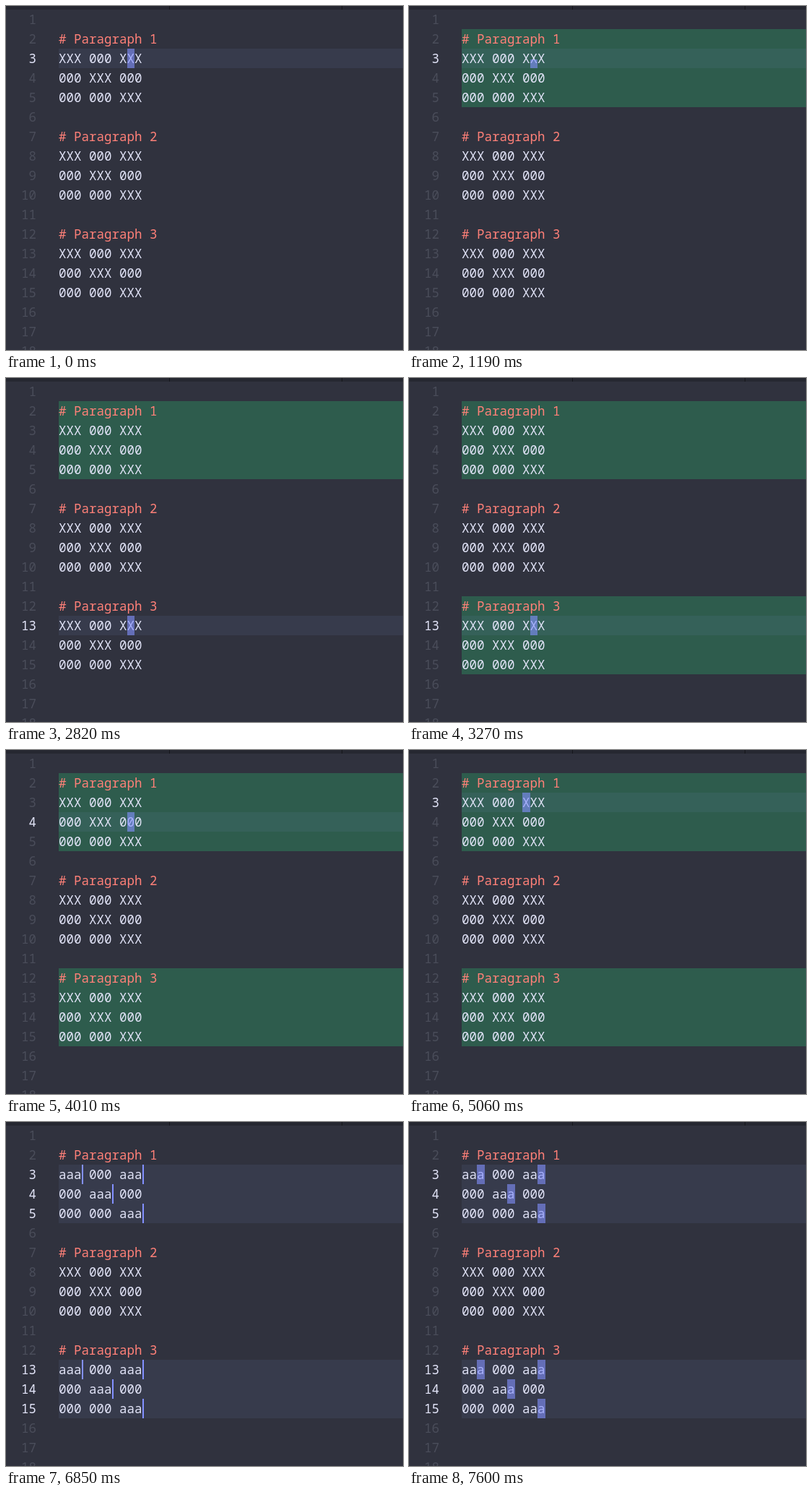
Animation of 550x476 px, one loop 8000 ms. Source, as an HTML page:

```html
<!DOCTYPE html>
<html lang="en">
<head>
<meta charset="utf-8">
<title>Multi-cursor editing</title>
<style>
  html, body { margin: 0; width: 100%; height: 100%; overflow: hidden; background: #30323e; }
  #stage {
    position: relative; width: 550px; height: 476px; overflow: hidden; background: #30323e;
    font: 500 17.5px/27px "Noto Sans Mono", "DejaVu Sans Mono", monospace;
    color: #e2e4f8; white-space: pre;
  }
  #stage div { position: absolute; }
  #tabs { left: 0; top: 0; width: 550px; height: 5px; background: #262831; }
  #tabs div { top: 0; width: 1px; height: 5px; background: #15161b; }
  #view { inset: 0; }
  .line { left: 73px; }
  .head { color: #ff8078; }
  .num { left: 0; width: 42px; text-align: right; color: #4a4d5a; font-weight: 400; }
  .num.on { color: #e2e4f8; }
  .row { background: rgba(120, 135, 190, .1); }
  .green { background: #2e5c4d; }
  .sel { background: #494c5a; }
  .cursor { background: #8390ff; opacity: .6; }
  .cursor.bar { opacity: 1; }
  #popup {
    left: 126px; top: 411px; width: 391px; height: 90px;
    background: #282a34; display: none;
  }
  #popup div { left: 0; top: 4px; width: 100%; height: 32px; line-height: 32px; background: #3a3e50; text-indent: 31px; }
</style>
</head>
<body>
<div id="stage">
  <div id="view"></div>
  <div id="tabs"><div style="left:226px"></div><div style="left:465px"></div></div>
  <div id="popup"><div>Paragraph</div></div>
</div>
<script>
const LOOP = 8000, LEFT = 73, CHAR = 10.5, ROW = 27;
const view = document.getElementById('view');
const popup = document.getElementById('popup');

const top_ = line => 5 + (line - 1) * ROW;
const colX = col => LEFT + col * CHAR;

// Each cue changes part of the state from its time on.
const cues = [
  [0, { at: [3, 9], shape: 'block', green: [], word: 'XXX', multi: false, sel: false, popup: false }],
  [450, { shape: 'none' }],
  [740, { shape: 'half' }],
  [1190, { green: [2] }],
  [1340, { shape: 'block' }],
  [1940, { at: [4, 9] }],
  [2090, { at: [5, 9] }],
  [2240, { at: [7, 9] }],
  [2380, { at: [8, 9] }],
  [2520, { at: [10, 9] }],
  [2820, { at: [13, 9] }],
  [3270, { green: [2, 12] }],
  [3560, { at: [12, 9] }],
  [3860, { at: [8, 9] }],
  [4010, { at: [4, 9] }],
  [4460, { at: [4, 8] }],
  [4760, { at: [4, 4] }],
  [4910, { at: [4, 0] }],
  [5060, { at: [3, 8] }],
  [5510, { green: [], multi: true, sel: true }],
  [6260, { sel: false, word: '', shape: 'bar' }],
  [6550, { word: 'a' }],
  [6700, { word: 'aa' }],
  [6850, { word: 'aaa' }],
  [7000, { popup: true }],
  [7300, { shape: 'none' }],
  [7600, { shape: 'block', popup: false }]
];

const box = (cls, x, y, w, h) =>
  `<div class="${cls}" style="left:${x}px;top:${y}px;width:${w}px;height:${h}px"></div>`;
const text = (cls, line, s) => `<div class="${cls}" style="top:${top_(line)}px">${s}</div>`;

function cursorBox([line, col], shape) {
  const x = colX(col), y = top_(line);
  if (shape === 'block') return box('cursor', x, y, CHAR, ROW);
  if (shape === 'half') return box('cursor', x, y + 15, CHAR, 12);
  if (shape === 'bar') return box('cursor bar', x, y, 2, ROW);
  return '';
}

// Word ends in the first and third paragraph.
function wordEnds(n) {
  return [3, 13].flatMap(l => [[l, n], [l, 2 * n + 5], [l + 1, n + 4], [l + 2, n + 8]]);
}

function render(s) {
  const ends = wordEnds(s.word.length);
  const back = s.shape === 'block' ? 1 : 0;
  const cursors = s.multi ? ends.map(([l, c]) => [l, c - back]) : [s.at];
  const active = [...new Set(cursors.map(c => c[0]))];

  let html = s.green.map(l => box('green', LEFT, top_(l), 550 - LEFT, 4 * ROW)).join('');
  for (const l of active) {
    html += s.sel ? box('row', 0, top_(l), LEFT, ROW) : box('row', LEFT, top_(l), 550 - LEFT, ROW);
  }
  if (s.sel) html += ends.map(([l, c]) => box('sel', colX(c - 3), top_(l), 3 * CHAR, ROW)).join('');

  for (let l = 1; l <= 18; l++) html += text(active.includes(l) ? 'num on' : 'num', l, l);
  for (let p = 0; p < 3; p++) {
    const l = 2 + 5 * p, w = p === 1 ? 'XXX' : s.word;
    html += text('line head', l, `# Paragraph ${p + 1}`)
      + text('line', l + 1, `${w} 000 ${w}`)
      + text('line', l + 2, `000 ${w} 000`)
      + text('line', l + 3, `000 000 ${w}`);
  }
  view.innerHTML = html + cursors.map(c => cursorBox(c, s.shape)).join('');
  popup.style.display = s.popup ? 'block' : 'none';
}

let shown = -1;
function tick() {
  const t = performance.now() % LOOP;
  const past = cues.filter(c => c[0] <= t);
  if (past.length !== shown) {
    shown = past.length;
    render(Object.assign({}, ...past.map(c => c[1])));
  }
  requestAnimationFrame(tick);
}
tick();
</script>
</body>
</html>
```
